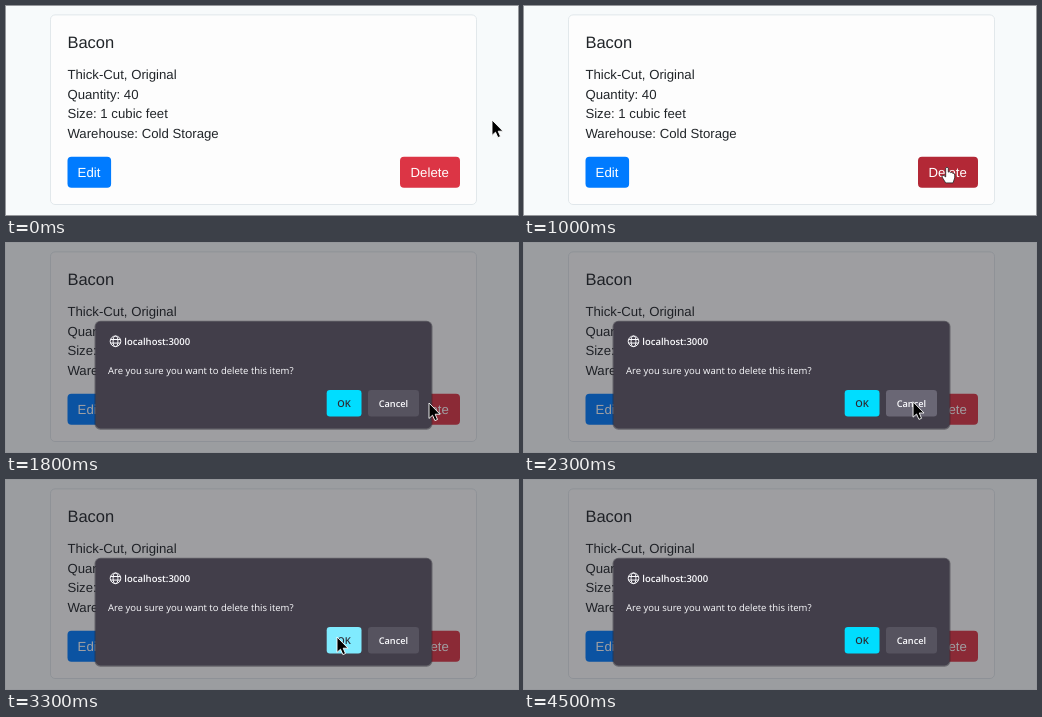
These frames come from a looping animation (512x209 px, 4600 ms). An HTML page:

```html
<!DOCTYPE html>
<html lang="en">
<head>
<meta charset="utf-8">
<title>Delete confirmation</title>
<style>
html, body { margin: 0; width: 100%; height: 100%; overflow: hidden; background: #f7fafb; }
svg { display: block; width: 100%; height: 100%; }
text { text-rendering: geometricPrecision; white-space: pre; }
#page { font: 13.2px "Liberation Sans", Arial, sans-serif; fill: #212529; }
#dialog { font: 500 9.5px "Open Sans", "Noto Sans", sans-serif; fill: #fbfbfe; }
.title { font-size: 16.5px; }
.bold { font-weight: 600; }
.label { fill: #fff; }
</style>
</head>
<body>
<svg viewBox="0 0 512 209">
  <g id="page">
    <rect width="512" height="209" fill="#f7fafb"/>
    <rect x="44.5" y="8.9" width="426" height="189.6" rx="4.5" fill="#fdfdfd" stroke="#dfe6e9" stroke-width=".9"/>
    <text class="title" x="61.4" y="41.8">Bacon</text>
    <text x="61.4" y="72.8">Thick-Cut, Original</text>
    <text x="61.4" y="92.5">Quantity: 40</text>
    <text x="61.4" y="112.2">Size: 1 cubic feet</text>
    <text x="61.4" y="132">Warehouse: Cold Storage</text>
    <rect x="61.5" y="150.7" width="43.6" height="31" rx="4" fill="#007bff"/>
    <text class="label" x="71.6" y="171">Edit</text>
    <rect id="delete" x="394" y="150.7" width="60" height="31" rx="4"/>
    <text class="label" x="404.6" y="171">Delete</text>
  </g>
  <g id="dialog">
    <rect width="512" height="209" fill="#1c1b22" opacity=".42"/>
    <rect x="88.5" y="77.7" width="338" height="109" rx="6" fill="#24222a" opacity=".45"/>
    <rect x="89.5" y="78.5" width="336" height="107" rx="5" fill="#423e4a"/>
    <g fill="none" stroke="#fbfbfe" stroke-width="1">
      <circle cx="109.5" cy="98.3" r="5.3"/>
      <ellipse cx="109.5" cy="98.3" rx="2.4" ry="5.3"/>
      <path d="M104.6 96.5h9.8M104.6 100.1h9.8"/>
    </g>
    <text class="bold" x="118.3" y="101.7">localhost:3000</text>
    <text x="102" y="131">Are you sure you want to delete this item?</text>
    <rect id="ok" x="320.7" y="147" width="34.8" height="26.5" rx="3.3"/>
    <text class="bold" x="338.1" y="163.7" text-anchor="middle" fill="#2b2a33">OK</text>
    <rect id="cancel" x="362" y="147" width="51" height="26.5" rx="3.3"/>
    <text class="bold" x="387.4" y="163.7" text-anchor="middle" font-size="9.2">Cancel</text>
  </g>
  <g id="cursor">
    <path id="arrow" d="M0 0V15.4L3.5 12.2L5.9 17.6L8.5 16.5L6.2 11.2H11Z" fill="#000" stroke="#fff" stroke-width=".9" stroke-linejoin="round"/>
    <path id="hand" d="M-1.3 1.2Q0-.8 1.3 1.2V5.2Q2.7 4.2 3.6 5.7Q5 4.9 5.8 6.4Q7.7 6 7.7 8V11L6 16H-1.3L-5 10Q-5 7.8-3 8.7L-1.3 10Z" fill="#fff" stroke="#222" stroke-width=".8" stroke-linejoin="round"/>
  </g>
</svg>
<script>
const LOOP = 4600, STEP = 100, OPEN = 1100, LEAVE = 4000;
// time, x, y of the pointer tip
const path = [
  [100, 486, 114], [800, 423, 161], [1900, 423, 160],
  [2600, 367, 158], [2800, 367, 158], [3200, 331, 157], [LOOP, 331, 157]
];
const el = id => document.getElementById(id);
const show = (id, on) => el(id).setAttribute("visibility", on ? "visible" : "hidden");
const fill = (id, color) => el(id).setAttribute("fill", color);

function pointer(t) {
  const i = Math.max(1, path.findIndex(p => p[0] >= t));
  const [t0, x0, y0] = path[i - 1], [t1, x1, y1] = path[i];
  const k = Math.max(0, (t - t0) / (t1 - t0)), e = k * k * (3 - 2 * k);
  return [x0 + (x1 - x0) * e, y0 + (y1 - y0) * e];
}

function over(id, x, y) {
  const [l, t, w, h] = ["x", "y", "width", "height"].map(a => +el(id).getAttribute(a));
  return x >= l && x <= l + w && y >= t && y <= t + h;
}

function draw(now) {
  const t = Math.floor(now % LOOP / STEP) * STEP;
  const [x, y] = pointer(t);
  const open = t >= OPEN, present = t < LEAVE;
  const hover = id => present && over(id, x, y);
  const onDelete = !open && hover("delete");
  show("dialog", open);
  show("arrow", present && !onDelete);
  show("hand", onDelete);
  fill("delete", onDelete ? "#b32836" : "#dc3545");
  fill("ok", hover("ok") ? "#80ebff" : "#00ddff");
  fill("cancel", hover("cancel") && x < 410 ? "#6a6775" : "#56535f");
  el("cursor").setAttribute("transform", `translate(${x} ${y})`);
  requestAnimationFrame(() => draw(performance.now()));
}
draw(0);
</script>
</body>
</html>
```
